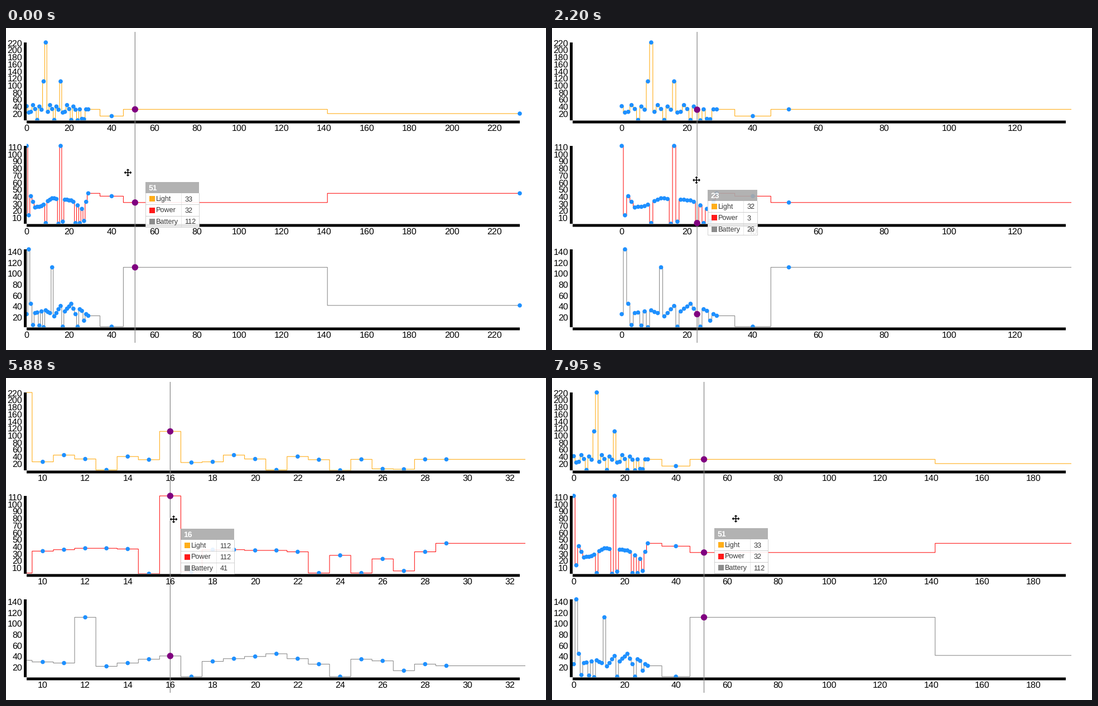
Animation of 968 by 579 pixels, one loop 8000 ms. Source, as a matplotlib script:

```python
import math

import matplotlib.pyplot as plt
import numpy as np
from matplotlib.animation import FuncAnimation
from matplotlib.collections import EllipseCollection
from matplotlib.patches import Polygon, Rectangle

W, H, DPI = 968, 579, 64
PT = 72 / DPI  # points per pixel
LEFT, RIGHT, EDGE = 37, 921, 931
PLOT_H = 140
STEP_MS, LOOP_MS = 40, 8000
TICK_MS = 147  # the picture only changes on this beat

plt.rcParams["font.family"] = "Liberation Sans"
plt.rcParams["text.hinting"] = "none"

TIMES = np.array([*range(30), 40, 51, 232], float)
MIDS = (TIMES[1:] + TIMES[:-1]) / 2
STAIRS = np.concatenate([TIMES[:1], np.repeat(MIDS, 2), TIMES[-1:]])


def curve(points):
    return np.interp(np.arange(len(TIMES)), list(points), list(points.values()))


def spiked(base, spikes):
    values = [round(v) for v in base]
    for k, v in spikes.items():
        values[k] = v
    return values


# Light repeats a cycle of eight readings, then settles
cycle = [24, 26, 45, 34, 3, 41, 32, 112]
light = spiked([42] + cycle * 3 + [33] * 8,
               {9: 222, 24: 2, 26: 6, 27: 5, 30: 14, 32: 21})
power = spiked(curve({2: 41, 4: 25, 7: 27, 12: 38, 21: 35, 27: 21, 29: 45,
                      30: 41, 31: 32, 32: 45}),
               {0: 112, 1: 14, 9: 3, 15: 2, 16: 112, 17: 5, 23: 3, 25: 3, 27: 6})
battery = spiked(curve({0: 26, 2: 45, 4: 28, 9: 33, 13: 22, 16: 41, 18: 31,
                        21: 45, 23: 26, 25: 35, 29: 23, 32: 42}),
                 {1: 145, 3: 6, 6: 5, 8: 2, 12: 112, 17: 3, 24: 3, 27: 14,
                  30: 3, 31: 112})

# name, colour, top of plot, label step, values
SERIES = [("Light", "orange", 26, 20, light),
          ("Power", "red", 212, 10, power),
          ("Battery", "gray", 398, 20, battery)]

# Pointer x, pointer y, pixel of x = 0, pixels per unit
START = (218.5, 260, 37, 3.8103)
# Kind, first tick, last tick, then the pointer's goal or the new scale and ease power
GESTURES = [
    ("move", 0, 1, 203.7, 260),
    ("drag", 1, 6, 356, 258),
    ("move", 7, 9, 308, 264),
    ("zoom", 10, 14, 5.875, 1),
    ("move", 14, 15, 259, 273.5),
    ("move", 15, 17, 205.3, 262),
    ("zoom", 19, 24, 38.24, 1),
    ("move", 24, 27, 545, 254),
    ("move", 27, 32, 300.5, 254),
    ("zoom", 39, 47, 4.578, 3),
    ("move", 47, 49, 517, 254),
    ("drag", 50, 54, 329.5, 253),
]


def pose(tick):
    """Replay the gestures up to a tick: zoom keeps the pointer's value fixed."""
    x, y, origin, scale = START
    for kind, first, last, a, b in GESTURES:
        f = min(max((tick - first) / (last - first), 0), 1)
        if kind == "zoom":
            factor = (a / scale) ** (f ** b)
            origin = x - (x - origin) * factor
            scale *= factor
        else:
            dx = (a - x) * f
            x += dx
            y += (b - y) * f
            origin += dx if kind == "drag" else 0
    return x, y, origin, scale


def x_ticks(origin, scale):
    lo, hi = (LEFT - origin) / scale, (RIGHT - origin) / scale
    raw = (hi - lo) / 10
    step = 10 ** math.floor(math.log10(raw))
    ratio = step / raw
    step *= 10 if ratio <= .15 else 5 if ratio <= .35 else 2 if ratio <= .75 else 1
    first = math.ceil(lo / step - 1e-3)
    return [k * step for k in range(first, math.floor(hi / step + 1e-3) + 1)]


fig = plt.figure(figsize=(W / DPI, H / DPI), dpi=DPI, facecolor="white")
ax = fig.add_axes([0, 0, 1, 1])
ax.set(xlim=(0, W), ylim=(H, 0))
ax.axis("off")


def label(x, y, text, px=16, **kw):
    return ax.text(x, y, text, fontsize=px * PT, va="baseline", **kw)


def box(x, y, w, h, color, **kw):
    return ax.add_patch(Rectangle((x, y), w, h, facecolor=color, lw=0, **kw))


def dots(n, diameter, color, z):
    size = [diameter] * n
    item = EllipseCollection(size, size, [0] * n, units="xy", facecolors=color,
                             linewidths=0, offsets=np.zeros((n, 2)),
                             offset_transform=ax.transData, zorder=z)
    return ax.add_collection(item, autolim=False)


class Panel:
    def __init__(self, name, color, top, step, values):
        self.values = values
        self.base = top + PLOT_H
        lo, hi = min(values), max(values)
        to_y = lambda v: self.base - (np.asarray(v) - lo) * PLOT_H / (hi - lo)
        self.ys = to_y(values)

        clip = Rectangle((LEFT, self.base), EDGE - LEFT, -self.base,
                         transform=ax.transData)
        self.line, = ax.plot(STAIRS, np.repeat(self.ys, 2), color=color, lw=PT,
                             solid_joinstyle="miter", snap=False, zorder=2)
        self.dots = dots(len(values), 7.6, "dodgerblue", 3)
        for item in (self.line, self.dots):
            item.set_clip_path(clip)

        box(LEFT - 5, top, 5, PLOT_H, "black", zorder=1)
        box(LEFT, self.base + .5, RIGHT - LEFT, 5, "black", snap=False, zorder=1)
        for v in range(step, hi + 1, step):
            label(29, to_y(v) + 5.2, str(v), ha="right")
        self.ticks = [label(0, self.base + 19.3, "", ha="center") for _ in range(17)]

    def update(self, origin, scale, marks):
        self.line.set_xdata(origin + scale * STAIRS)
        self.dots.set_offsets(np.column_stack([origin + scale * TIMES, self.ys]))
        for i, tick in enumerate(self.ticks):
            tick.set_visible(i < len(marks))
            if i < len(marks):
                tick.set_x(origin + scale * marks[i])
                tick.set_text(str(marks[i]))


class Tooltip:
    HEAD, ROW, SPLIT = 20, 20.4, 64

    def __init__(self):
        kw = dict(alpha=.9, zorder=6)
        self.body = box(0, 0, 1, self.ROW * 3, "white", **kw)
        self.head = box(0, 0, 1, self.HEAD, "#aaaaaa", **kw)
        self.title = label(0, 0, "", 14, color="white", weight="bold", zorder=8)
        rule = dict(color="#cccccc", lw=PT, alpha=.9, zorder=7)
        self.frame, = ax.plot([], [], **rule)
        self.rules = [ax.plot([], [], **rule)[0] for _ in range(2)]
        self.split, = ax.plot([], [], ls=(0, (1, 1)), **rule)
        text = dict(color="#222222", alpha=.9, zorder=8)
        self.rows = [(box(0, 0, 10, 10, s[1], alpha=.9, zorder=8),
                      label(0, 0, s[0], 12.6, **text),
                      label(0, 0, "", 12.6, **text)) for s in SERIES]

    def update(self, x, y, title, values):
        w = 95.5 if max(values) > 99 else 88.5
        top = y + self.HEAD
        end = top + 3 * self.ROW
        self.head.set_xy((x, y))
        self.body.set_xy((x, top))
        self.head.set_width(w)
        self.body.set_width(w)
        self.title.set_position((x + 5, y + 15))
        self.title.set_text(title)
        self.frame.set_data([x, x, x + w, x + w], [top, end, end, top])
        self.split.set_data([x + self.SPLIT] * 2, [top, end])
        for i, rule in enumerate(self.rules, 1):
            rule.set_data([x, x + w], [top + i * self.ROW] * 2)
        for i, (swatch, name, number) in enumerate(self.rows):
            mid = top + (i + .5) * self.ROW
            swatch.set_xy((x + 6.5, mid - 5))
            name.set_position((x + 18.5, mid + 4.5))
            number.set_position((x + 70, mid + 4.5))
            number.set_text(str(values[i]))


def arrows():
    arm = np.array([(.8, -.8), (4, -.8), (4, -2.9), (6.9, 0), (4, 2.9), (4, .8)])
    turn = np.array([(0, 1), (-1, 0)])
    parts = [arm]
    for _ in range(3):
        parts.append(parts[-1] @ turn)
    return np.concatenate(parts)


panels = [Panel(*s) for s in SERIES]
guide, = ax.plot([0, 0], [7, 566], color="#8c8c8c", lw=1.3 * PT, snap=False,
                 solid_capstyle="butt", zorder=4)
focus = dots(len(panels), 11.4, "purple", 5)
tooltip = Tooltip()
ARROWS = arrows()
halo = ax.add_patch(Polygon(ARROWS, fc="white", ec="white", lw=2 * PT, zorder=9))
pointer = ax.add_patch(Polygon(ARROWS, fc="black", lw=0, zorder=10))


def update(i):
    px, py, origin, scale = pose((i * STEP_MS + STEP_MS - 2) // TICK_MS)
    marks = x_ticks(origin, scale)
    for panel in panels:
        panel.update(origin, scale, marks)

    near = int(np.searchsorted(MIDS, (px - origin) / scale))
    x = origin + scale * TIMES[near]
    guide.set_xdata([x, x])
    focus.set_offsets([(x, p.ys[near]) for p in panels])
    tooltip.update(x + 19, py + 17, f"{TIMES[near]:.0f}",
                   [p.values[near] for p in panels])
    for shape in (halo, pointer):
        shape.set_xy(ARROWS + (px, py))


anim = FuncAnimation(fig, update, frames=LOOP_MS // STEP_MS, interval=STEP_MS,
                     repeat=True, repeat_delay=0)
plt.show()
```
